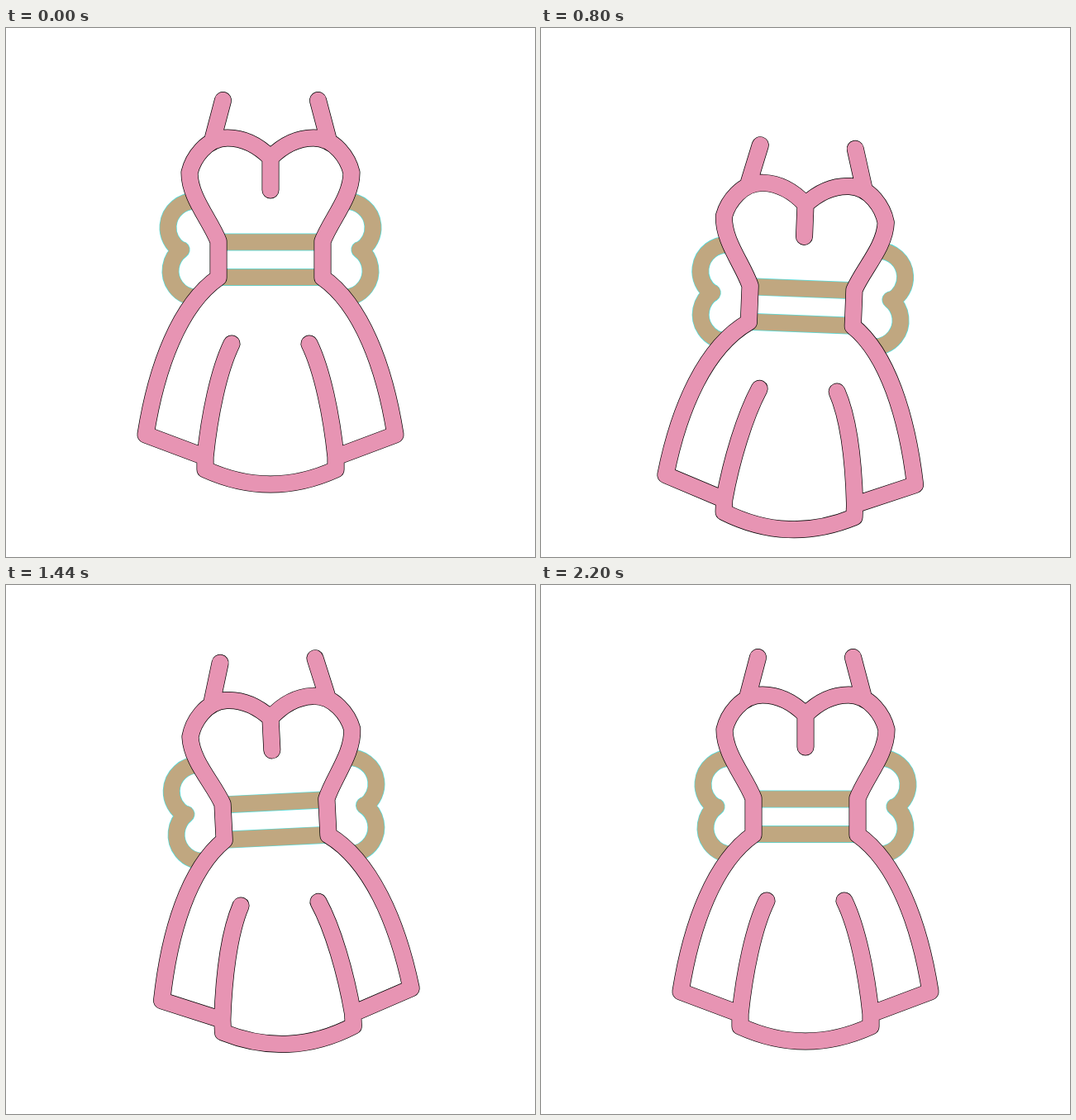
An HTML page with a canvas for the animation above (2.24 s loop, 640 by 640 pixels).

```html
<!DOCTYPE html>
<html lang="en">
<head>
<meta charset="utf-8">
<title>Swinging dress</title>
<style>
html, body { margin: 0; width: 100%; height: 100%; overflow: hidden; background: #fff; }
canvas { display: block; width: 640px; height: 640px; }
</style>
</head>
<body>
<canvas id="stage" width="640" height="640"></canvas>
<script>
const ctx = document.getElementById('stage').getContext('2d');
const LOOP = 2240, STEP = 40, MID = 320, PIVOT = 158;
const PINK = '#e794b3', TAN = '#c0a780', INK = '#000', CYAN = '#4fdede';

// [ms, value] keys
const TURN = [[80, 0], [320, 9], [540, 15.7], [640, 13.1], [960, -8.3], [1080, -11], [1280, -7.5], [1590, 0]];
const DROP = [[155, 0], [815, 56.5], [1560, 0]];
const SWAY = [[80, 0], [320, -2.8], [540, -11], [660, -15.7], [960, 10.3], [1180, 15], [1280, 14], [1640, -12.5], [1700, -13.3], [2200, 0]];
const LIFT = [[320, 0], [640, -2.6], [960, 0]];

// Slope of a monotone cubic at key i, flat at peaks and ends
function slope(keys, i) {
  if (i === 0 || i === keys.length - 1) return 0;
  const [a, b, c] = [keys[i - 1], keys[i], keys[i + 1]];
  const h0 = b[0] - a[0], h1 = c[0] - b[0];
  const d0 = (b[1] - a[1]) / h0, d1 = (c[1] - b[1]) / h1;
  if (d0 * d1 <= 0) return 0;
  const w0 = 2 * h1 + h0, w1 = h1 + 2 * h0;
  return (w0 + w1) / (w0 / d0 + w1 / d1);
}

function sample(keys, t) {
  const last = keys.length - 1;
  if (t <= keys[0][0]) return keys[0][1];
  if (t >= keys[last][0]) return keys[last][1];
  let i = 0;
  while (t > keys[i + 1][0]) i++;
  const [t0, v0] = keys[i], [t1, v1] = keys[i + 1];
  const h = t1 - t0, u = (t - t0) / h, e = u * u * (3 - 2 * u);
  return v0 + (v1 - v0) * e
    + h * slope(keys, i) * u * (1 - u) * (1 - u)
    - h * slope(keys, i + 1) * u * u * (1 - u);
}

function bowPath(sway) {
  const path = new Path2D();
  for (const y of [259, 301.5]) {
    path.moveTo(257, y);
    path.lineTo(383, y);
  }
  const rad = Math.PI / 180;
  for (const side of [1, -1]) {
    const lobe = new Path2D();
    lobe.arc(-92, 241.5, 32, -85 * rad, 121.6 * rad, true);
    lobe.arc(-89 + side * sway * 0.1, 294, 32, -126.2 * rad, 85 * rad, true);
    path.addPath(lobe, new DOMMatrix([side, 0, 0, 1, MID, 0]));
  }
  return path;
}

function dressPath(sway, lift) {
  const path = new Path2D();
  path.moveTo(MID, 157);
  path.lineTo(MID, 196);

  for (const side of [1, -1]) {
    // k is how far a point follows the hem
    const at = (x, y, k = 0) => [MID + side * (x - MID) + k * sway, y + k * lift];
    const move = (...p) => path.moveTo(...at(...p));
    const line = (...p) => path.lineTo(...at(...p));
    const curve = (a, b, c) => path.bezierCurveTo(...at(...a), ...at(...b), ...at(...c));

    move(262.5, 87.5);
    line(250.5, 133);

    move(MID, 157);
    curve([306, 143], [288, 133], [268, 133]);
    curve([242, 133], [226, 158], [222, 175]);
    curve([222, 205], [247, 232], [257, 258]);
    line(257, 302);
    curve([210, 335, 0.75], [182, 410, 1], [169, 492, 1]);
    line(241, 519, 1);

    move(273, 382);
    curve([257, 415], [246, 470, 0.65], [241, 519, 1]);
    line(241, 534, 1);
    path.quadraticCurveTo(...at(280.5, 552, 1), ...at(MID, 552, 1));
  }
  return path;
}

function outline(path, edge, fill, cap) {
  ctx.lineCap = cap;
  ctx.lineJoin = 'round';
  ctx.strokeStyle = edge;
  ctx.lineWidth = 21;
  ctx.stroke(path);
  ctx.strokeStyle = fill;
  ctx.lineWidth = 19.6;
  ctx.stroke(path);
}

function draw(t) {
  const sway = sample(SWAY, t);
  ctx.setTransform(1, 0, 0, 1, 0, 0);
  ctx.fillStyle = '#fff';
  ctx.fillRect(0, 0, 640, 640);
  ctx.translate(MID, PIVOT + sample(DROP, t));
  ctx.rotate(sample(TURN, t) * Math.PI / 180);
  ctx.translate(-MID, -PIVOT);
  outline(bowPath(sway), CYAN, TAN, 'butt');
  outline(dressPath(sway, sample(LIFT, t)), INK, PINK, 'round');
}

const start = performance.now();
function frame() {
  const t = Math.max(0, performance.now() - start) % LOOP;
  draw(Math.floor(t / STEP) * STEP);
  requestAnimationFrame(frame);
}
frame();
</script>
</body>
</html>
```
